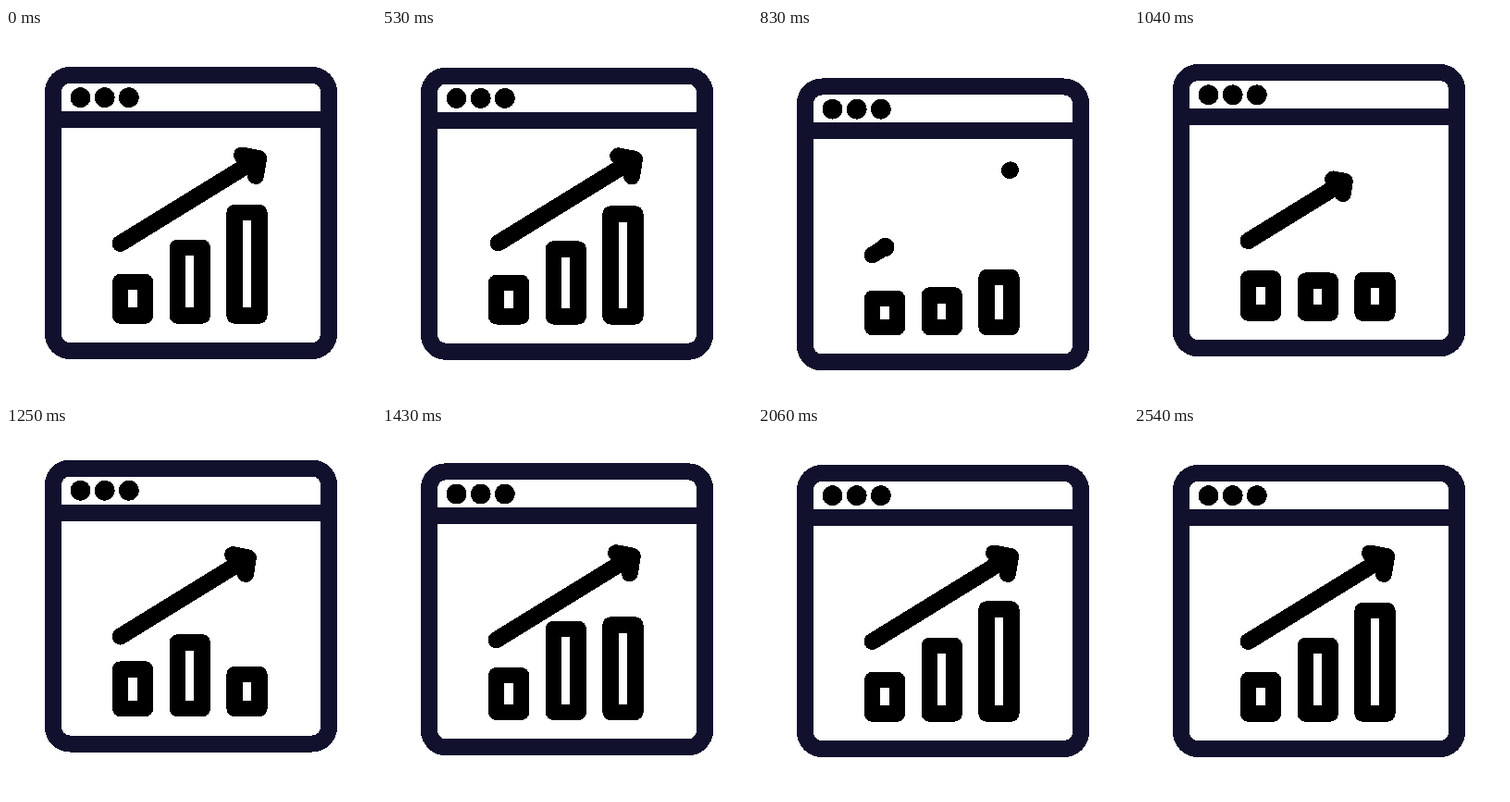
Animation of 400x400 px, one loop 2630 ms. Source, as an HTML page:

```html
<!DOCTYPE html>
<html lang="en">
<head>
<meta charset="utf-8">
<title>Growth chart</title>
<style>
  html, body { margin: 0; height: 100%; overflow: hidden; background: #fff; }
  svg { display: block; width: 100%; height: 100%; shape-rendering: crispEdges; }
  path, rect { fill: none; stroke: #000; stroke-width: 17.5; stroke-linecap: round; stroke-linejoin: round; }
  .frame { stroke: #11112e; stroke-width: 18; stroke-linecap: butt; }
  #arrows { stroke-width: 18; }
</style>
</head>
<body>
<svg viewBox="0 0 400 400">
  <g id="scene">
    <rect class="frame" x="51" y="51" width="298" height="298" rx="18"/>
    <path class="frame" d="M51 99H349"/>
    <circle cx="80.5" cy="75.2" r="10.9"/>
    <circle cx="106.7" cy="75.2" r="10.9"/>
    <circle cx="132.8" cy="75.2" r="10.9"/>
    <path id="bars"/>
    <path id="arrows"/>
  </g>
</svg>
<script>
const LOOP = 2630, START = 500, END = 2540, STEP = 30;
const BASE = 311, BAR_WIDTH = 26.7, STROKE = 17.5;
const TAIL = [123.5, 233], TIP = [273, 141];

const [scene, bars, arrows] = ['scene', 'bars', 'arrows'].map(id => document.getElementById(id));

const progress = (t, from, to) => Math.min(1, Math.max(0, (t - from) / (to - from)));
const swing = x => (1 - Math.cos(Math.PI * x)) / 2;
const mix = (a, b, x) => a + (b - a) * x;

// Swing to `low`, swing on to `high`, then settle back to `rest`.
function bounce(t, { rest, low, lowAt, leave, high, highAt, decay }) {
  if (t < leave) return mix(rest, low, swing(progress(t, START, lowAt)));
  if (t < highAt) return mix(low, high, swing(progress(t, leave, highAt)));
  const k = decay * (t - highAt) / 1000;
  return mix(rest, high, (1 + k) * Math.exp(-k));
}

const sway = { rest: 0, low: 16, lowAt: 715, leave: 715, high: -7, highAt: 1165, decay: 10.3 };

// Outer bar heights.
const barMoves = [
  { x: 123.7, rest: 54, low: 48.5, lowAt: 790, leave: 800, high: 60, highAt: 1260, decay: 9.5 },
  { x: 185.5, rest: 91, low: 52, lowAt: 840, leave: 1020, high: 108, highAt: 1400, decay: 10 },
  { x: 247.1, rest: 129, low: 53, lowAt: 990, leave: 1220, high: 154, highAt: 1600, decay: 10 }
];

const barPath = (x, height) =>
  `M${x} ${BASE}v${STROKE - height}h${BAR_WIDTH}V${BASE}z`;

// Shaft between two fractions of the full length, with a scaled head.
function arrowPath(from, to) {
  const at = p => [0, 1].map(i => mix(TAIL[i], TIP[i], p));
  const size = to - from, [x, y] = at(to);
  return `M${at(from)}L${x} ${y}M${x - 18 * size} ${y - 3.5 * size}L${x} ${y}l${-3 * size} ${19 * size}`;
}

function arrowsAt(t) {
  const erased = progress(t, START, 850), grown = progress(t, 807, 1902);
  const eased = erased < 0.5 ? 2 * erased ** 2 : 1 - 2 * (1 - erased) ** 2;
  return (erased < 1 ? arrowPath(eased, 1) : '') +
         (grown > 0 ? arrowPath(0, 1 - (1 - grown) ** 5) : '');
}

function draw(now) {
  const raw = Math.min(END, now % LOOP);
  const t = START + Math.max(0, Math.floor((raw - START) / STEP)) * STEP;
  scene.setAttribute('transform', `translate(0 ${bounce(t, sway)})`);
  bars.setAttribute('d', barMoves.map(bar => barPath(bar.x, bounce(t, bar))).join(''));
  arrows.setAttribute('d', arrowsAt(t));
}

const began = performance.now();
function tick() {
  draw(performance.now() - began);
  requestAnimationFrame(tick);
}
tick();
</script>
</body>
</html>
```
